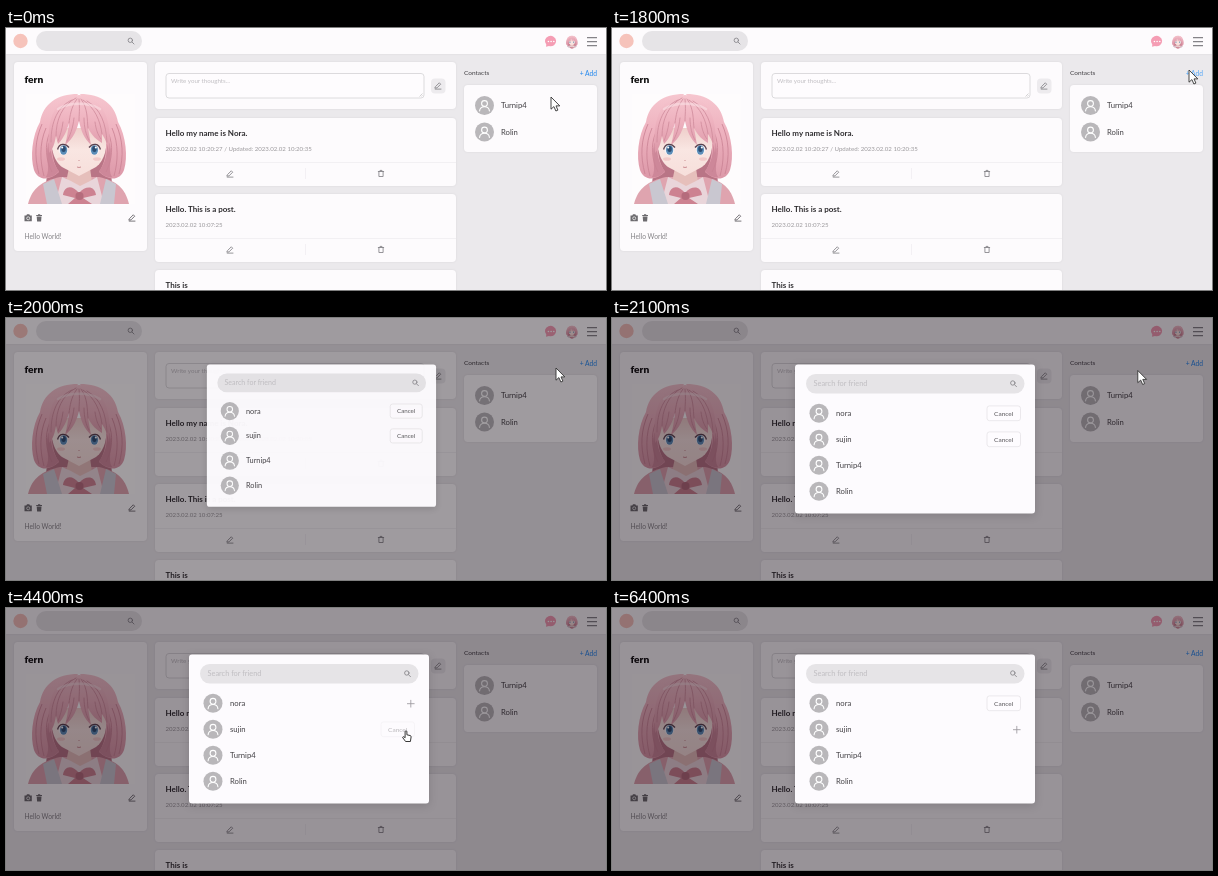
An HTML page that plays this animation: 600 by 262 pixels, repeating every 6.5 s.

```html
<!DOCTYPE html>
<html lang="en">
<head>
<meta charset="utf-8">
<title>Contacts dialog</title>
<style>
  html, body { margin: 0; width: 100%; height: 100%; overflow: hidden; background: #ebe9ec; }
  svg { display: block; width: 100%; height: 100%; }
  text { font-family: Lato, "Open Sans", sans-serif; font-size: 7.7px; fill: #434145; white-space: pre; }
  .card { fill: #fdfbfd; filter: drop-shadow(0 .5px 1px rgba(0, 0, 0, .07)); }
  .title { font-size: 8px; font-weight: 700; fill: #2f2d30; }
  .date { font-size: 6.12px; fill: #9b999c; }
  .hint { font-size: 7.4px; fill: #c0bec2; }
  .line { stroke: #f0eef1; stroke-width: .8; }
  .icon { fill: none; stroke: #858388; stroke-width: .85; stroke-linecap: round; stroke-linejoin: round; }
  .dark { stroke: #626065; }
  .plus { stroke: #9b999d; }
  .pill { fill: #e6e4e7; }
  #dialog { transform-origin: 580px 46px; }
  #panel { fill: #fdfbfe; filter: drop-shadow(0 2px 4px rgba(0, 0, 0, .14)); }
  .cancel rect { fill: #fefcff; stroke: #e6e4e7; stroke-width: .8; }
  .cancel text { font-size: 6.5px; fill: #59575b; }
</style>
</head>
<body>
<svg viewBox="0 0 600 262">
  <defs>
    <g id="pen"><path d="M-2.4 1 1.3-2.7 2.7-1.3-1 2.4-2.8 2.6ZM-2.8 3.6H3"/></g>
    <g id="bin"><path d="M-2.7-2H2.7M-1-2V-3.1H1V-2M-2.1-2V3H2.1V-2"/></g>
    <g id="lens"><circle cx="-.7" cy="-.7" r="2.2"/><path d="M1 1 3 3"/></g>
    <g id="user">
      <circle r="9.5" fill="#b9b7ba"/>
      <g fill="none" stroke="#fff" stroke-width="1.1" stroke-linecap="round">
        <circle cy="-2" r="2.9"/><path d="M-4.9 5.4C-4.5-.2 4.5-.2 4.9 5.4"/>
      </g>
    </g>
    <g id="post">
      <rect class="card" x="149" width="301" height="68" rx="4"/>
      <path class="line" d="M149 44.5H450M299.5 50V61"/>
      <use href="#pen" class="icon" x="224" y="55.5"/>
      <use href="#bin" class="icon" x="375" y="55.5"/>
    </g>
    <clipPath id="frame"><rect width="109" height="110"/></clipPath>
    <clipPath id="round"><circle cx="566" cy="14" r="6.5"/></clipPath>
    <linearGradient id="hair" x2="0" y2="1">
      <stop stop-color="#f6c6cf"/><stop offset=".45" stop-color="#eeb2bf"/><stop offset="1" stop-color="#dc98a8"/>
    </linearGradient>
    <linearGradient id="skin" x2="0" y2="1">
      <stop stop-color="#efcfcb"/><stop offset=".45" stop-color="#f9e6e2"/><stop offset="1" stop-color="#f7dfdb"/>
    </linearGradient>

    <g id="portrait" clip-path="url(#frame)">
      <rect width="109" height="110" fill="#fefcfd"/>
      <path d="M24 50H83L86 90H20Z" fill="#b97586"/>
      <path d="M2 110C6 94 16 87 34 83H73C91 87 99 94 103 110Z" fill="#dfa4af"/>
      <path d="M43 74H64L66 88 54 96 40 88Z" fill="#e6bfbb"/>
      <path d="M36 83 45 87 54 92 64 87 71 83 78 110H29Z" fill="#e9d5da"/>
      <path d="M17 90 28 85 36 110H21ZM80 85 90 90 88 110H74Z" fill="#c9c7d0"/>
      <path d="M53 99C46 90 38 92 37 101L49 104 42 110H66L57 104 70 101C69 92 60 91 53 99Z" fill="#cd8291"/>
      <circle cx="53.5" cy="102" r="4" fill="#b56c7c"/>
      <path d="M25 34C24 57 29 68 36 73L53 82 70 73C79 66 82 54 80 34Z" fill="url(#skin)"/>
      <g id="lock">
        <path d="M52 0C31 0 17 10 14 28 6 42 4 63 8 76 12 87 24 87 33 78 28 70 25 61 26 44L42 16Z" fill="url(#hair)"/>
        <path d="M26 43C23 58 27 70 33 77 29 82 24 84 20 83 25 75 19 65 22 50Z" fill="#cd8799"/>
        <path d="M16 30C9 46 8 62 13 80M20 34C13 50 14 68 18 82M24 38C18 52 20 66 26 78" fill="none" stroke="#c98294" stroke-width=".8"/>
      </g>
      <use href="#lock" transform="matrix(-1 0 0 1 106 0)"/>
      <path d="M53 1C30 3 20 22 23 59 28 54 29 47 30 42L32 50C38 44 41 36 43 29 42 37 41 44 39 51 48 44 51 35 53 27 55 37 58 44 65 51L62 34C66 42 71 46 76 49L76 40C80 46 82 52 83 59 87 24 76 3 53 1Z" fill="url(#hair)"/>
      <g fill="none" stroke="#cf8b9b" stroke-width=".8" stroke-linecap="round">
        <path d="M50 4C36 11 30 26 30 42M51 5C45 13 44 22 43 29M53 5C54 15 53 21 53 27M55 5C62 14 61 26 62 34M57 6C69 14 74 26 76 40"/>
        <path d="M46 6C32 12 25 27 25 48M61 7C75 15 80 30 81 48M48 24C47 34 44 42 41 47M58 24C58 33 60 41 63 46M37 28C36 36 34 42 32 47M69 28C70 36 72 41 75 45"/>
      </g>
      <path d="M32 15C44 8 62 8 74 15" fill="none" stroke="#fae0e4" stroke-width="2.5" stroke-linecap="round" opacity=".6"/>
      <g id="eye">
        <ellipse cx="37.4" cy="56" rx="4.8" ry="5" fill="#f6f2f5"/>
        <ellipse cx="37.6" cy="56" rx="3.6" ry="4.8" fill="#5b8db8"/>
        <ellipse cx="37.6" cy="55" rx="2.2" ry="3" fill="#2c4c70"/>
        <circle cx="36.2" cy="53.6" r="1" fill="#fff"/>
        <path d="M31.6 55.5C33 49.5 39 48.5 43 53.5" fill="none" stroke="#59424f" stroke-width="1.3"/>
      </g>
      <use href="#eye" transform="matrix(-1 0 0 1 106 0)"/>
      <g fill="#f0c0c0" opacity=".7"><ellipse cx="35" cy="65" rx="4" ry="1.8"/><ellipse cx="71" cy="65" rx="4" ry="1.8"/></g>
      <path d="M51 73Q53 74 55 73M53 66V67" fill="none" stroke="#b86c74" stroke-width=".7"/>
    </g>
  </defs>

  <rect width="600" height="262" fill="#ebe9ec"/>

  <rect class="card" width="600" height="26"/>
  <circle cx="14.5" cy="13" r="7.2" fill="#f6c3bb"/>
  <rect class="pill" x="30" y="3" width="106" height="20" rx="10"/>
  <use href="#lens" class="icon" x="125" y="13"/>
  <path d="M540 18.8 540.3 16.5A5.6 5.2 0 1 1 543 18.1Z" fill="#f59db4"/>
  <g fill="#fff"><circle cx="542.4" cy="13.5" r=".8"/><circle cx="545.1" cy="13.5" r=".8"/><circle cx="547.8" cy="13.5" r=".8"/></g>
  <g clip-path="url(#round)"><use href="#portrait" transform="translate(559.3 7.3) scale(.124)"/></g>
  <path d="M581 9.7H591M581 13.7H591M581 17.7H591" stroke="#858388" stroke-width="1.2"/>

  <rect class="card" x="8" y="34" width="133" height="189" rx="4"/>
  <text x="18.5" y="55" style="font-size:10.2px;font-weight:900;fill:#111">fern</text>
  <use href="#portrait" x="20" y="66"/>
  <g fill="#6c6a6e">
    <path d="M18.5 187.5H20.3L21 186.3H23.3L24 187.5H25.8V193.3H18.5Z"/>
    <path d="M30.2 187H36V188H30.2ZM32 186.2H34.2V187H32ZM30.7 188.6H35.5L35.1 193.6H31.1Z"/>
  </g>
  <circle cx="22.2" cy="190.3" r="1.5" fill="none" stroke="#fff" stroke-width=".7"/>
  <use href="#pen" class="icon dark" x="126" y="189.5"/>
  <text x="18.5" y="210.5" style="font-size:6.7px;fill:#858387">Hello World!</text>

  <rect class="card" x="149" y="34" width="301" height="47" rx="4"/>
  <rect x="160" y="45.5" width="258" height="24.5" rx="3" fill="#fefcfe" stroke="#d9d7da" stroke-width=".9"/>
  <text class="hint" x="165" y="55" style="font-size:6.2px">Write your thoughts...</text>
  <path d="M413.5 68.5 416.5 65.5M415.3 68.5 416.5 67.3" stroke="#aaa" stroke-width=".5"/>
  <rect x="425" y="50.5" width="14.5" height="15" rx="4" fill="#edebee"/>
  <use href="#pen" class="icon" x="432" y="57.5"/>

  <use href="#post" y="90"/>
  <text class="title" x="159.5" y="108">Hello my name is Nora.</text>
  <text class="date" x="159.5" y="122.5">2023.02.02 10:20:27 / Updated: 2023.02.02 10:20:35</text>
  <use href="#post" y="166"/>
  <text class="title" x="159.5" y="184">Hello. This is a post.</text>
  <text class="date" x="159.5" y="198.5">2023.02.02 10:07:25</text>
  <use href="#post" y="242"/>
  <text class="title" x="159.5" y="260">This is</text>

  <text x="458" y="47.3" style="font-size:6.5px">Contacts</text>
  <text id="add" x="591" y="47.7" text-anchor="end" style="font-size:6.7px">+ Add</text>
  <rect class="card" x="458" y="57" width="133" height="67" rx="4"/>
  <use href="#user" x="478.5" y="77.5"/><text x="495" y="80.3">Turnip4</text>
  <use href="#user" x="478.5" y="104"/><text x="495" y="106.7">Rolin</text>

  <rect id="shade" width="600" height="262" fill="#0c040c"/>

  <g id="dialog">
    <rect id="panel" x="183" y="46.5" width="240" height="149" rx="3"/>
    <rect class="pill" x="194" y="56" width="218.5" height="19.5" rx="9.7"/>
    <text class="hint" x="201.5" y="68.2">Search for friend</text>
    <path id="caret" d="M202 60.5V70.5" stroke="#333" stroke-width=".8"/>
    <use href="#lens" class="icon" x="401.5" y="65.7"/>
    <g id="rows"></g>
  </g>

  <g id="pointer">
    <path id="arrow" d="M0 0V12.2L2.9 9.6 4.9 14 6.9 13.1 5 8.9H8.8Z" fill="#fff" stroke="#333" stroke-width=".9" stroke-linejoin="round"/>
    <path id="beam" d="M-2-5H-.6L0-4.4.6-5H2M0-4.4V4.4M-2 5H-.6L0 4.4.6 5H2" fill="none" stroke="#222" stroke-width="1.1"/>
    <path id="hand" d="M-.9.7C-.9-.4.9-.4.9.7V3.8L4.4 4.6C5 4.8 5.2 5.3 5.1 6L4.4 10.5H-.4L-3.3 6.6C-3.4 5.6-2.4 5.4-1.8 6L-.9 6.8Z" fill="#fff" stroke="#222" stroke-width=".9" stroke-linejoin="round"/>
  </g>
</svg>

<script>
  const LOOP = 6500, STEP = 100;
  const $ = id => document.getElementById(id);
  const show = (el, on) => el.style.display = on ? '' : 'none';

  $('rows').innerHTML = ['nora', 'sujin', 'Turnip4', 'Rolin'].map((name, i) => {
    const y = 95.3 + i * 26;
    const action = i > 1 ? '' : `
      <g class="cancel"><rect x="375" y="${y - 7.4}" width="33.5" height="14.8" rx="2.5"/>
      <text x="391.7" y="${y + 2.5}" text-anchor="middle">Cancel</text></g>
      <path class="icon plus" d="M401.4 ${y + .4}h6.8m-3.4-3.4v6.8"/>`;
    return `<use href="#user" x="207" y="${y}"/><text x="224" y="${y + 2.6}">${name}</text>${action}`;
  }).join('');
  const cancels = document.querySelectorAll('.cancel');
  const pluses = document.querySelectorAll('.plus');

  // Pointer path: time, x, y
  const path = [
    [0, 545, 69], [700, 568, 54], [1100, 577, 42], [1900, 577, 42], [2000, 550, 50],
    [2400, 395, 66], [2800, 324, 71], [2900, 322, 71], [3100, 322, 71], [3500, 397, 97],
    [3900, 397, 97], [4200, 399, 122.5], [4400, 400, 123], [4900, 401, 124],
    [5200, 404, 95], [5500, 404, 95], [6000, 392, -16]
  ];

  function pointAt(t) {
    const i = path.findIndex(p => p[0] > t);
    if (i < 0) return path[path.length - 1].slice(1);
    const [t0, x0, y0] = path[i - 1], [t1, x1, y1] = path[i];
    const k = (t - t0) / (t1 - t0), e = k * k * (3 - 2 * k);
    return [x0 + (x1 - x0) * e, y0 + (y1 - y0) * e];
  }

  function setAction(i, state) {
    show(cancels[i], state !== 'add');
    show(pluses[i], state === 'add');
    cancels[i].style.opacity = state === 'busy' ? .4 : 1;
  }

  function draw(t) {
    const [x, y] = pointAt(t);
    $('pointer').setAttribute('transform', `translate(${x} ${y})`);
    const open = t >= 2100;
    const typing = open && x > 194 && x < 412 && y > 56 && y < 76;
    const pressing = open && x > 375 && x < 409 && y > 88 && y < 129;
    show($('beam'), typing);
    show($('hand'), pressing);
    show($('arrow'), !typing && !pressing);
    $('add').style.fill = t >= 1000 && t < 2000 ? '#56a8f7' : '#2388ee';

    // Opening zoom grows out of the clicked link
    const [scale, alpha, dim] = open ? [1, 1, .42] : t >= 2000 ? [.955, .97, .39] : [.7, .58, .15];
    show($('dialog'), t >= 1900);
    $('dialog').style.transform = `scale(${scale})`;
    $('dialog').style.opacity = alpha;
    $('shade').style.opacity = t >= 1900 ? dim : 0;
    show($('caret'), t >= 2800 && t < 3300);

    setAction(0, t < 3600 || t >= 5500 ? 'cancel' : t < 3900 ? 'busy' : 'add');
    setAction(1, t < 4400 ? 'cancel' : t < 4700 ? 'busy' : 'add');
  }

  const start = performance.now();
  function tick() {
    const t = (performance.now() - start) % LOOP;
    draw(Math.floor(t / STEP) * STEP);
    requestAnimationFrame(tick);
  }
  tick();
</script>
</body>
</html>
```
